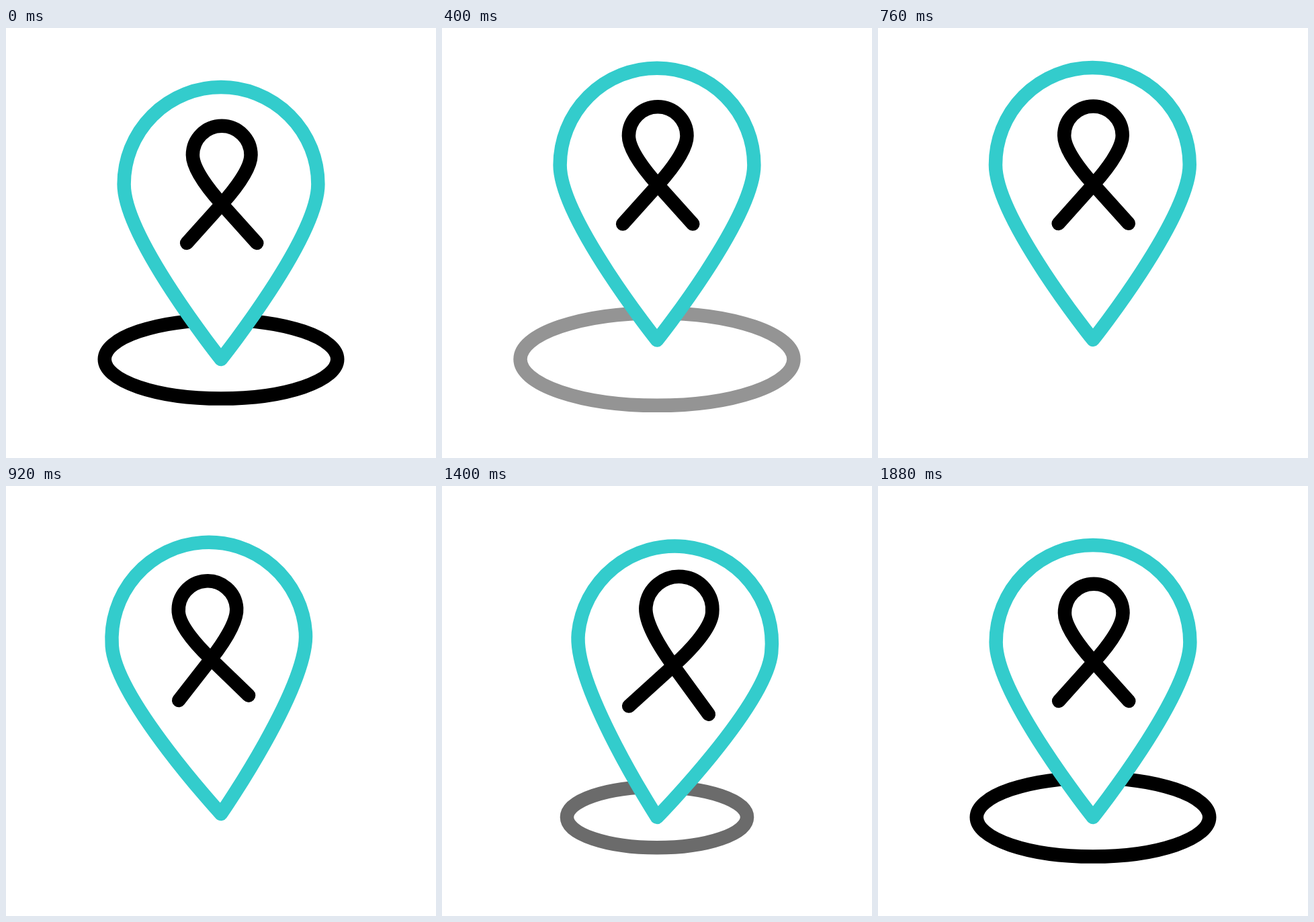
These frames come from a looping animation (640x640 px, 2000 ms). An HTML page with a canvas:

```html
<!DOCTYPE html>
<html lang="en">
<head>
<meta charset="utf-8">
<title>Map pin with ribbon</title>
<style>
  html, body { margin: 0; width: 100%; height: 100%; overflow: hidden; background: #fff; }
  canvas { display: block; width: 640px; height: 640px; }
</style>
</head>
<body>
<canvas id="stage" width="640" height="640"></canvas>
<script>
const ctx = document.getElementById('stage').getContext('2d');
const LOOP = 2000, STEP = 40;
const LINE = 20.5;
const TIP = { x: 320, y: 493 };
const MID = { x: 321.2, y: 233 };
const SMOOTH = [1 / 3, 2 / 3];

// Cubic easing with control points (x1, 0) and (x2, 1)
function ease(p, [x1, x2]) {
  if (p <= 0) return 0;
  if (p >= 1) return 1;
  let lo = 0, hi = 1, s = 0.5;
  for (let i = 0; i < 30; i++) {
    s = (lo + hi) / 2;
    const r = 1 - s;
    const x = 3 * s * r * r * x1 + 3 * s * s * r * x2 + s * s * s;
    if (x < p) lo = s; else hi = s;
  }
  return s * s * (3 - 2 * s);
}

// Keys: [time, value, easing towards the next key]
function track(keys, t) {
  if (t <= keys[0][0]) return keys[0][1];
  for (let i = 1; i < keys.length; i++) {
    const [t0, a, curve] = keys[i - 1];
    const [t1, b] = keys[i];
    if (t < t1) return a + (b - a) * ease((t - t0) / (t1 - t0), curve || SMOOTH);
  }
  return keys[keys.length - 1][1];
}

const LIFT = [[40, 0, [0.5, 0.667]], [600, 44.5], [1004, 0]];
const SWING = [[730, 0], [1110, -8], [1425, 6.1], [1670, -3], [1880, 0]];
const SWELL = [[1030, 1], [1440, 1.15], [1880, 1]];
const LEAVE = [[40, 0, [0.6, 0.667]], [600, 1]];
const RETURN = [[1000, 0, [0.31, 0.557]], [1800, 1]];

function stroke(color) {
  ctx.strokeStyle = color;
  ctx.lineWidth = LINE;
  ctx.lineCap = ctx.lineJoin = 'round';
  ctx.stroke();
}

function ring(t) {
  const gone = track(LEAVE, t), back = track(RETURN, t);
  const early = t < 800;
  const alpha = early ? 1 - gone : back;
  const k = early ? 1 + 0.3 * gone : 0.463 + 0.537 * back;
  if (alpha <= 0) return;
  ctx.globalAlpha = alpha;
  ctx.beginPath();
  ctx.ellipse(TIP.x, TIP.y, 173.25 * k, 58.6 * k, 0, 0, Math.PI * 2);
  stroke('#000');
  ctx.globalAlpha = 1;
}

function pin() {
  const r = 144.4, y = 232.5, pull = 312.3;
  ctx.beginPath();
  ctx.moveTo(TIP.x, TIP.y);
  ctx.bezierCurveTo(TIP.x, TIP.y, TIP.x - r, pull, TIP.x - r, y);
  ctx.arc(TIP.x, y, r, Math.PI, 0);
  ctx.bezierCurveTo(TIP.x + r, pull, TIP.x, TIP.y, TIP.x, TIP.y);
  ctx.closePath();
  ctx.fillStyle = '#fff';
  ctx.fill();
  stroke('#33cccc');
}

function ribbon(k) {
  const r = 43.3, y = 189 - MID.y;
  ctx.save();
  ctx.translate(MID.x, MID.y);
  ctx.save();
  ctx.scale(k, k);
  ctx.beginPath();
  ctx.moveTo(52.1, 87);
  ctx.lineTo(0, 29);
  ctx.bezierCurveTo(-18, 9, -r, -23, -r, y);
  ctx.arc(0, y, r, Math.PI, 0);
  ctx.bezierCurveTo(r, -23, 18, 9, 0, 29);
  ctx.lineTo(-52.1, 87);
  ctx.restore();
  // Stroked outside the scale so the line weight stays fixed
  stroke('#000');
  ctx.restore();
}

function draw(t) {
  ctx.fillStyle = '#fff';
  ctx.fillRect(0, 0, 640, 640);
  ring(t);
  ctx.save();
  ctx.translate(TIP.x, TIP.y - track(LIFT, t));
  ctx.rotate(track(SWING, t) * Math.PI / 180);
  ctx.translate(-TIP.x, -TIP.y);
  pin();
  ribbon(track(SWELL, t));
  ctx.restore();
}

const start = performance.now();
function tick() {
  const t = (performance.now() - start) % LOOP;
  draw(Math.floor(t / STEP) * STEP);
  requestAnimationFrame(tick);
}
tick();
</script>
</body>
</html>
```
